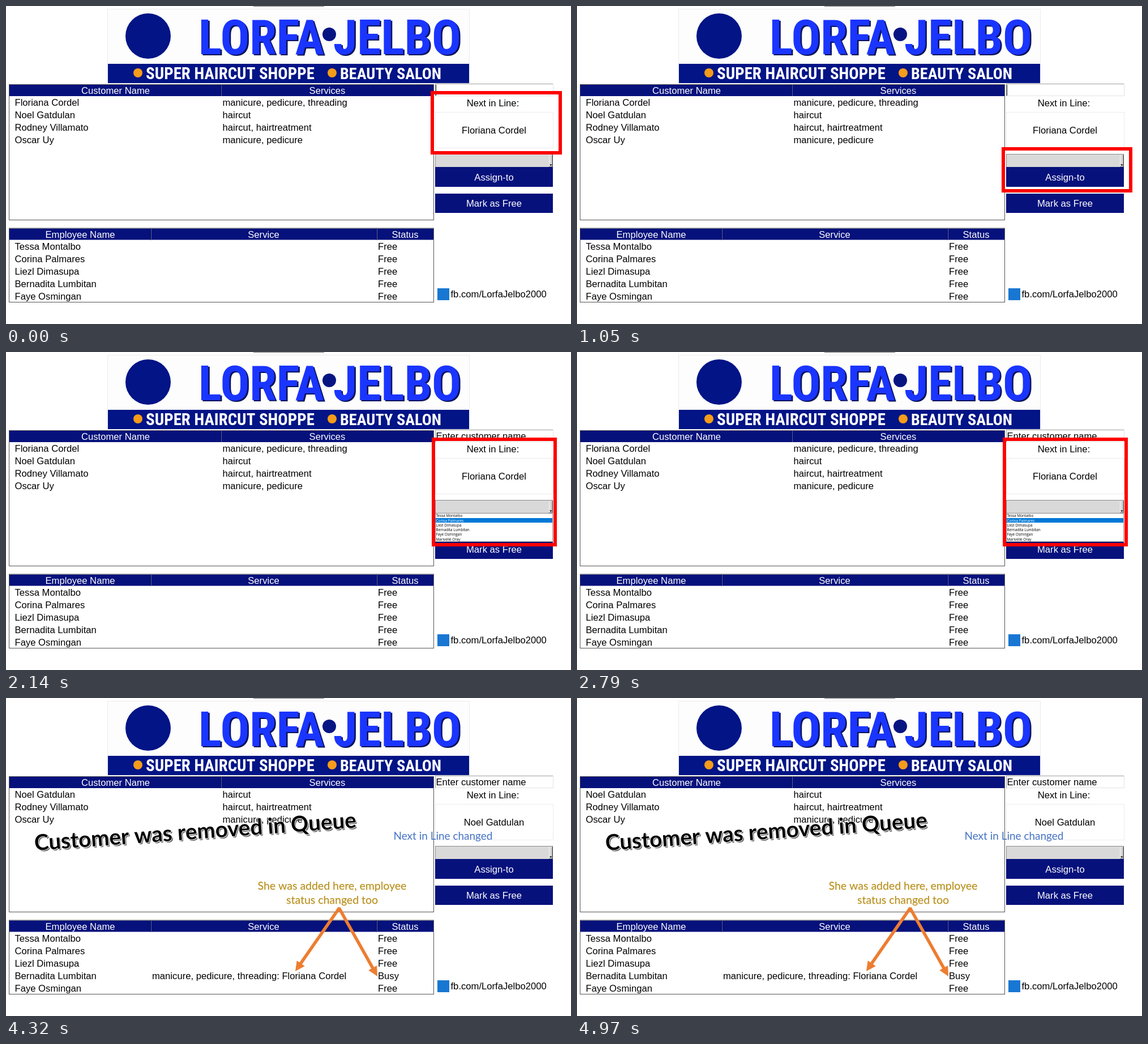
An HTML page with a canvas that plays this animation: 998x561 px, repeating every 5410 ms.

```html
<!DOCTYPE html>
<html lang="en">
<head>
<meta charset="utf-8">
<title>Salon queue</title>
<style>
html, body { margin: 0; width: 100%; height: 100%; overflow: hidden; background: #fff; }
canvas { display: block; }
</style>
</head>
<body>
<canvas id="stage" width="998" height="561"></canvas>
<script>
const ctx = document.getElementById('stage').getContext('2d');
const LOOP = 5410, CUTS = [1050, 2140, 3230, 4320];
const NAVY = '#06117c', BLUE = '#1a35ff', RED = '#ff0000', ORANGE = '#ed7d31';
const BODY = '16.65px "Liberation Sans", Arial, sans-serif';
const SMALL = '6.4px "Open Sans", sans-serif';

const customers = [
  ['Floriana Cordel', 'manicure, pedicure, threading'],
  ['Noel Gatdulan', 'haircut'],
  ['Rodney Villamato', 'haircut, hairtreatment'],
  ['Oscar Uy', 'manicure, pedicure']
];
const staff = ['Tessa Montalbo', 'Corina Palmares', 'Liezl Dimasupa',
  'Bernadita Lumbitan', 'Faye Osmingan', 'Marivelle Oray'];
const CHOSEN = 3;
// left, top, right, bottom of the highlight per step
const marks = [
  [750, 150, 982, 262], [750, 249, 981, 329],
  [752, 151, 973, 343], [752, 152, 973, 330]
];

function box(x, y, r, b, fill) {
  ctx.fillStyle = fill;
  ctx.fillRect(x, y, r - x, b - y);
}

function outline(x, y, r, b, color, w = 1) {
  ctx.strokeStyle = color;
  ctx.lineWidth = w;
  ctx.strokeRect(x + w / 2, y + w / 2, r - x - w, b - y - w);
}

function disc(x, y, r, fill) {
  ctx.fillStyle = fill;
  ctx.beginPath();
  ctx.arc(x, y, r, 0, 7);
  ctx.fill();
}

function text(s, x, y, color = '#000', align = 'left', font = BODY) {
  ctx.font = font;
  ctx.textAlign = align;
  ctx.fillStyle = color;
  ctx.fillText(s, x, y);
}

const label = (s, x, y, color) => text(s, x, y + 6, color, 'center');

// Font size at which s spans w, up to max
function fitSize(s, w, face, max = 200) {
  ctx.font = face(100);
  return Math.min(max, 100 * w / ctx.measureText(s).width);
}

// Narrowest heavy face available
const heavy = [
  n => `900 ${n}px Roboto, sans-serif`,
  n => `900 condensed ${n}px Roboto, sans-serif`,
  n => `900 ${n}px "Roboto Condensed", Roboto, sans-serif`,
  n => `800 condensed ${n}px "Open Sans", sans-serif`,
  n => `900 extra-condensed ${n}px "Noto Sans", sans-serif`
].map(face => {
  ctx.font = face(100);
  return { face, w: ctx.measureText('SUPER HAIRCUT').width };
}).sort((a, b) => a.w - b.w)[0].face;
const lato = n => `${n}px Lato, sans-serif`;
const latoBold = n => `bold ${n}px Lato, sans-serif`;

function banner() {
  box(437, 0, 562, 1, '#777');
  box(180, 6, 818, 102, '#fdfdfd');
  outline(179, 5, 819, 137, '#ececec');
  box(180, 102, 818, 136, '#021486');
  disc(251, 53, 40, '#021486');

  disc(571, 50, 12, '#071583');
  for (const [s, x, w] of [['LORFA', 451, 222], ['JELBO', 691, 226]]) {
    const n = fitSize(s, w, heavy, 116), y = 54 + n * 0.357;
    text(s, x + 2.5, y + 2.5, '#0a1257', 'center', heavy(n));
    text(s, x, y, BLUE, 'center', heavy(n));
  }
  for (const [s, x, w] of [['SUPER HAIRCUT SHOPPE', 247, 298], ['BEAUTY SALON', 590, 179]]) {
    const n = fitSize(s, w, heavy, 33);
    disc(x - 14, 118, 8, '#f59c1a');
    text(s, x + w / 2, 118.5 + n * 0.357, '#fff', 'center', heavy(n));
  }
}

function table(top, bottom, splits, heads) {
  box(6, top + 1, 755, top + 21, NAVY);
  for (const x of splits) {
    box(x - 1, top + 1, x, top + 21, '#000848');
    box(x, top + 1, x + 1, top + 21, '#5c64a6');
  }
  outline(5, top, 756, bottom, '#555');
  for (const [s, x] of heads) label(s, x, top + 11, '#fff');
}

function tables(done) {
  table(138, 378, [380], [['Customer Name', 193.5], ['Services', 567.5]]);
  customers.slice(done ? 1 : 0).forEach(([name, job], i) => {
    const y = 176.2 + i * 21.8;
    text(name, 15.5, y);
    text(job, 382.5, y);
  });
  table(391.5, 523, [256, 655], [['Employee Name', 131], ['Service', 455], ['Status', 705]]);
  staff.slice(0, 5).forEach((name, i) => {
    const y = 430.3 + i * 21.8, busy = done && i === CHOSEN;
    text(name, 15.5, y);
    if (busy) text(`${customers[0][1]}: ${customers[0][0]}`, 258, y);
    text(busy ? 'Busy' : 'Free', 657, y);
  });
}

function button(s, top, bottom) {
  box(758, top, 966, bottom, NAVY);
  label(s, 862, (top + bottom) / 2, '#fff');
}

function panel(step) {
  outline(758, 137, 967, 159, '#e3e3e3');
  box(758, 137, 966, 138, '#a0a0a0');
  box(758, 137, 759, 159, '#a0a0a0');
  if (step < 2) box(759, 139, 760, 158, '#222');
  else text('Enter customer name', 759.5, 154.2);

  label('Next in Line:', 860, 170.5);
  outline(758, 187, 967, 251, '#ebebeb');
  label(customers[step === 4 ? 1 : 0][0], 862, 219.3);

  box(758, 262, 966, 284, '#d9d9d9');
  box(758, 261, 966, 262, '#8a8a8a');
  box(758, 261, 759, 284, '#8a8a8a');
  box(959, 263, 960, 283, '#f4f4f4');
  box(964, 263, 965, 283, '#999');
  box(965, 262, 966, 284, '#444');
  box(959, 283, 966, 284, '#777');
  ctx.fillStyle = '#000';
  ctx.beginPath();
  ctx.moveTo(960, 279.5);
  ctx.lineTo(964.5, 279.5);
  ctx.lineTo(962.2, 282);
  ctx.fill();

  button('Assign-to', 284, 319);
  button('Mark as Free', 331, 365);
  box(762, 498, 783, 519, '#1877d2');
  text('fb.com/LorfaJelbo2000', 785.5, 514.2);
}

function dropList() {
  box(758, 284, 966, 335, '#fff');
  outline(758, 284, 966, 335, '#888');
  box(759, 293, 965, 301, '#0078d7');
  staff.forEach((s, i) =>
    text(s, 759.5, 291.2 + i * 8.3, i === 1 ? '#fff' : '#000', 'left', SMALL));
}

function selection() {
  ctx.font = BODY;
  const end = 760 + ctx.measureText(staff[CHOSEN]).width;
  box(759, 263, end, 283, '#4a6984');
  box(end, 263, end + 1, 283, '#222');
  text(staff[CHOSEN], 759.5, 279, '#fff');
}

function arrow(x1, y1, x2, y2) {
  const len = Math.hypot(x2 - x1, y2 - y1);
  ctx.save();
  ctx.translate(x1, y1);
  ctx.rotate(Math.atan2(y2 - y1, x2 - x1));
  box(0, -2.8, len - 15, 2.8, ORANGE);
  ctx.beginPath();
  ctx.moveTo(len, 0);
  ctx.lineTo(len - 17, -8.5);
  ctx.lineTo(len - 17, 8.5);
  ctx.fill();
  ctx.restore();
}

function notes() {
  const head = 'Customer was removed in Queue';
  const font = latoBold(fitSize(head, 570, latoBold));
  ctx.save();
  ctx.translate(51, 269);
  ctx.rotate(-0.071);
  text(head, 2, 2.5, '#6a6a6a', 'left', font);
  ctx.lineJoin = 'round';
  ctx.lineWidth = 2;
  ctx.strokeStyle = '#fff';
  ctx.strokeText(head, 0, 0);
  text(head, 0, 0, '#000', 'left', font);
  ctx.restore();

  const next = 'Next in Line changed';
  text(next, 684.5, 249.5, '#4472c4', 'left', lato(fitSize(next, 175, lato)));

  const added = 'She was added here, employee';
  const small = lato(fitSize(added, 263, lato));
  [[added, 338], ['status changed too', 363]].forEach(([s, y]) => {
    text(s, 576.5, y + 1, '#eadcb4', 'center', small);
    text(s, 576, y, '#b8901e', 'center', small);
  });
  arrow(589, 370, 511, 482);
  arrow(588, 370, 656, 491);
}

function draw(step) {
  box(0, 0, 998, 561, '#fff');
  banner();
  tables(step === 4);
  panel(step);
  if (step === 2) dropList();
  if (step === 3) selection();
  if (step === 4) notes();
  else outline(...marks[step], RED, 6);
}

const start = performance.now();
function tick() {
  const t = (performance.now() - start) % LOOP;
  draw(CUTS.filter(c => t >= c).length);
  requestAnimationFrame(tick);
}
tick();
</script>
</body>
</html>
```
